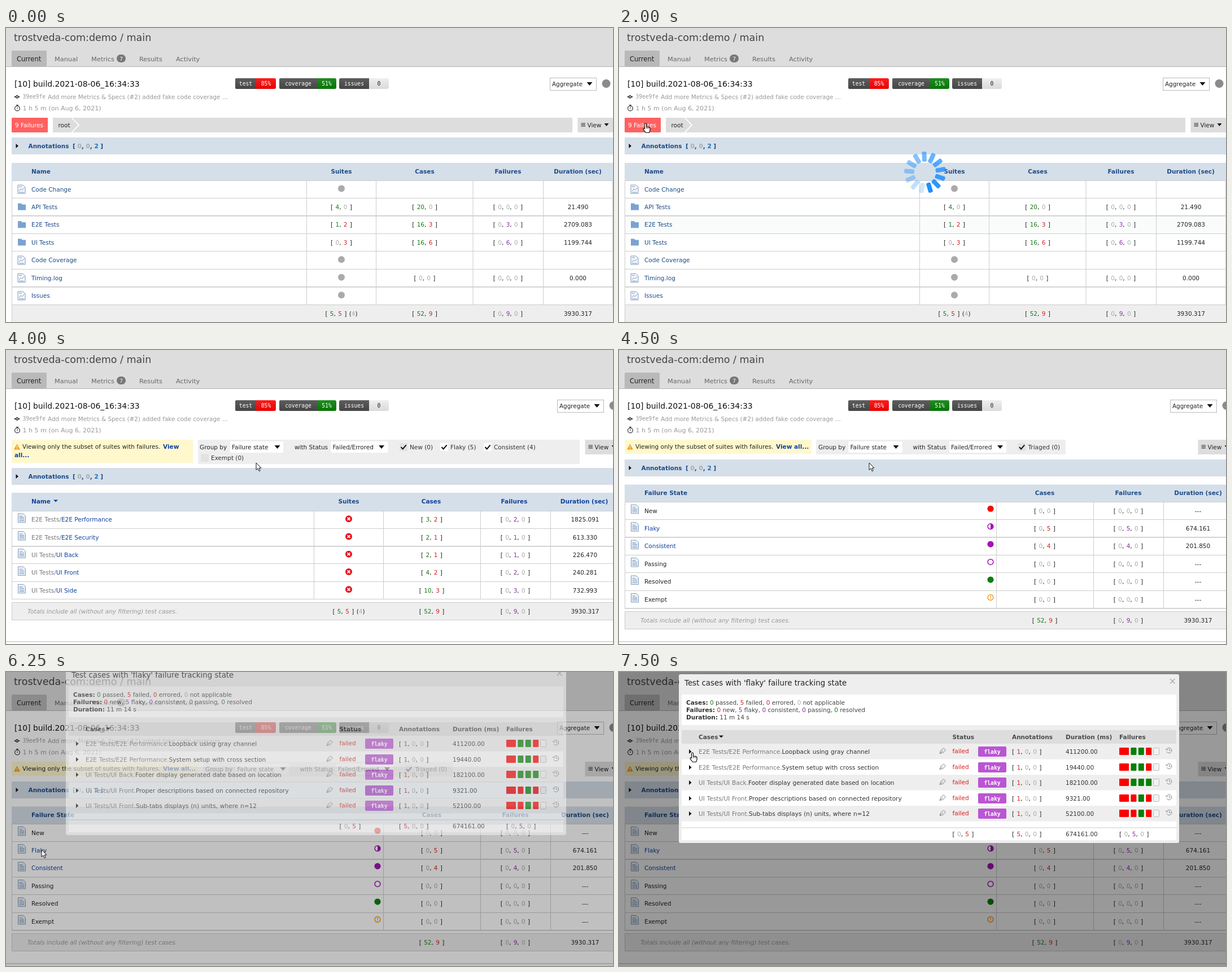
Recreate the animation shown at these times as an HTML page. Size 1075 px wide and 521 px high, loop 8000 ms.

```html
<!DOCTYPE html>
<html lang="en">
<head>
<meta charset="utf-8">
<title>Build results</title>
<style>
html, body { margin: 0; width: 100%; height: 100%; overflow: hidden; background: #fff; }
svg { display: block; width: 100vw; height: 100vh; }
text { font-family: "DejaVu Sans", Verdana, sans-serif; white-space: pre; }
.mono { font-family: "DejaVu Sans Mono", monospace; }
.vals { word-spacing: 1px; }
.case { word-spacing: .4px; }
</style>
</head>
<body>
<svg id="stage" viewBox="0 0 1075 521" xmlns="http://www.w3.org/2000/svg"></svg>
<script>
const LOOP = 8000, TICK = 250;
const LINK = '#1d4b87', LINK2 = '#10409c', INK = '#222', BAR = '#d5dfe9', RULE = '#ccc';
const TONE = { g: '#157a15', r: '#d81e1e', p: '#8a2ba8', b: '#1673c4', z: '#aaa' };

// --- drawing helpers; text is placed by the vertical middle of its line
const rect = (x, y, w, h, fill, extra = '') =>
  `<rect x="${x}" y="${y}" width="${w}" height="${h}" fill="${fill}" ${extra}/>`;
const path = (d, extra) => `<path d="${d}" ${extra}/>`;
const circle = (x, y, r, extra) => `<circle cx="${x}" cy="${y}" r="${r}" ${extra}/>`;
const group = (id, body, extra = '') => `<g id="${id}" ${extra}>${body}</g>`;
const span = (s, fill, extra = '') => `<tspan fill="${fill}" ${extra}>${s}</tspan>`;

function text(x, y, s, fill = INK, o = {}) {
  const size = o.size || 10.5;
  return `<text x="${x}" y="${Math.round(y + size * 0.36)}" font-size="${size}" fill="${fill}"` +
    ` text-anchor="${o.mid ? 'middle' : 'start'}" class="${o.cls || ''}" ${o.extra || ''}>${s}</text>`;
}
const bold = (x, y, s, fill, o = {}) => text(x, y, s, fill, { ...o, extra: 'font-weight="700"' });
const mid = (x, y, s, fill) => text(x, y, s, fill, { mid: true });

// "4g 0z" becomes [ 4, 0 ] with toned numbers
const num = v => span(v.slice(0, -1), TONE[v.slice(-1)]);
const list = s => '[ ' + s.split(' ').map(num).join(', ') + ' ]';
const vals = (x, y, s, isMid = true, tail = '') =>
  text(x, y, list(s) + tail, INK, { mid: isMid, cls: 'vals' });

const down = (x, y, w = 10, h = 6, fill = '#111') =>
  path(`M${x - w / 2} ${y - h / 2}h${w}l${-w / 2} ${h}z`, `fill="${fill}"`);
const right = (x, y) => path(`M${x} ${y - 4}l4.5 4l-4.5 4z`, 'fill="#111"');

function select(x, y, w, label, tri) {
  return rect(x, y - 10, w, 20, '#fff') + (label ? text(x + 3, y, label) : '') + down(tri, y);
}
function check(x, y, label, fill, on = true) {
  return rect(x, y - 7, 14, 14, fill, 'rx="1"') +
    (on ? path(`M${x + 2.5} ${y}l3.2 3.4l6-7`, 'fill="none" stroke="#111" stroke-width="2"') : '') +
    text(x + 18, y, label, '#333');
}

// --- icons
const docIcon = (x, y) =>
  path(`M${x} ${y - 7.5}h9l4 4v11.5h-13z`, 'fill="#eef3f9" stroke="#7d99bd"') +
  path(`M${x + 2} ${y - 3}h6m-6 2.7h9m-9 2.7h9m-9 2.6h9`, 'stroke="#7d99bd" stroke-width="1.1"');
const chartIcon = (x, y) =>
  path(`M${x} ${y - 7}h9l4 4v11h-13z`, 'fill="#f4f7fb" stroke="#7d99bd"') +
  path(`M${x + 2} ${y + 4}l3-4l2.5 2l4-4.5M${x + 2} ${y - 4}h5M${x + 2} ${y + 6}h9`, 'fill="none" stroke="#7d99bd"');
const folderIcon = (x, y) =>
  path(`M${x} ${y - 6}h6l1.5 2h6.5v10h-14z`, 'fill="#7ba2d0"');
const failIcon = (x, y) => circle(x, y, 6, 'fill="#e8121c"') +
  path(`M${x - 2.4} ${y - 2.4}l4.8 4.8m0-4.8l-4.8 4.8`, 'stroke="#fff" stroke-width="1.8"');
const warnIcon = y => path(`M19.5 ${y - 5}l5.5 10h-11z`, 'fill="#f5a11c"') +
  path(`M19.5 ${y - 1.5}v3m0 1v1.3`, 'stroke="#fff" stroke-width="1.2"');
const penIcon = (x, y) =>
  path(`M${x - 5} ${y + 4.5}l2-5.5l4.5-4l4 3l-4.5 5zl6-5.5`, 'fill="none" stroke="#888"');
const pastIcon = (x, y) =>
  path(`M${x - 4} ${y - 2}a4.6 4.6 0 1 1 0 4M${x - 5.5} ${y - 3}l1 2.2l2.6-.6M${x + .5} ${y - 2.5}v2.7h2.4`,
    'fill="none" stroke="#888"');

// --- page parts
function badge(x, split, end, label, value, color, ink = '#fff') {
  const o = { mid: true, cls: 'mono', size: 9.7 };
  return rect(x, 89, end - x, 19, color, 'rx="3"') +
    path(`M${split} 89H${x + 3}a3 3 0 0 0-3 3v13a3 3 0 0 0 3 3H${split}z`, 'fill="#4c4c4c"') +
    rect(x, 89, end - x, 19, 'url(#gloss)', 'rx="3"') +
    text((x + split) / 2, 99, label, '#fff', o) + text((split + end) / 2, 99, value, ink, o);
}

function header() {
  const tabs = [['Manual', 86], ['Metrics', 151], ['Results', 236], ['Activity', 301]];
  return rect(0, 0, 1075, 68, '#ddd') + rect(0, 68, 1075, 1, '#b4b4b4') +
    text(14, 17, 'trostveda-com:demo / main', '#444', { size: 17.5 }) +
    rect(10, 40, 62, 28, '#b9b9b9', 'rx="2"') + text(19, 55, 'Current', INK, { size: 11.5 }) +
    tabs.map(([s, x]) => text(x, 55, s, '#666', { size: 11.3 })).join('') +
    rect(196, 47, 16, 14, '#777', 'rx="7"') + text(204, 54.5, '7', '#fff', { size: 9, mid: true }) +
    text(15, 99, '[10] build.2021-08-06_16:34:33', '#111', { size: 13.9 }) +
    path('M14.5 122h10', 'stroke="#222" stroke-width="1.4"') +
    circle(19.5, 122, 2, 'fill="#fff" stroke="#222" stroke-width="1.4"') +
    text(29.5, 122, '39ee9fe', '#999', { size: 9.6, cls: 'mono' }) +
    text(74, 122, 'Add more Metrics &amp; Specs (#2) added fake code coverage ...', '#999', { size: 10.43 }) +
    circle(20, 142.5, 4.4, 'fill="none" stroke="#333" stroke-width="1.2"') +
    path('M18 136.5h4m-2 0v2m0 2v2.5', 'stroke="#333" stroke-width="1.2"') +
    text(29.5, 142.5, '1 h 5 m (on Aug 6, 2021)', '#999', { size: 11.05 }) +
    badge(406, 443, 478, 'test', '85%', '#fb0505') +
    badge(484, 551, 585, 'coverage', '51%', '#098009') +
    badge(590, 643, 678, 'issues', '0', '#eee', '#222');
}

const controls = () =>
  rect(963.5, 88.5, 82, 22, '#fff', 'stroke="#bbb"') + text(967, 99, 'Aggregate', INK, { size: 10.4 }) +
  down(1033.5, 99) + circle(1063, 98.5, 7.5, 'fill="#8b8b8b"') +
  rect(1012.5, 159, 70, 26, '#ddd') + text(1029.5, 172, 'View') + down(1063.5, 171.5, 8, 5) +
  path('M1018.5 169h7.5m-7.5 2.5h7.5m-7.5 2.5h7.5', 'stroke="#222" stroke-width="1.1"');

const annotations = top => rect(10, top, 1065, 30, BAR) + right(17.5, top + 15) +
  bold(39.5, top + 15, 'Annotations', LINK) + bold(118, top + 15, list('0z 0z 2b'), LINK);

// Row rules and column rules of a table; cell() fills each row
function table(top, pitch, cols, rows, cell) {
  const bottom = top + pitch * rows.length;
  let s = rows.map((r, i) => cell(r, top + pitch * (i + .5))).join('');
  for (let i = 0; i <= rows.length; i++)
    s += rect(10, Math.floor(top + pitch * i), 1065, i % 4 === 2 ? 1.7 : 1, RULE);
  return s + [10, ...cols].map(x => rect(x, top, 1, bottom - top, RULE)).join('');
}

const totals = (y, suites) => rect(10.5, y, 1070, 31, '#eee', `stroke="${RULE}"`) +
  text(38, y + 15.5, 'Totals include all (without any filtering) test cases.', '#999', { extra: 'font-style="italic"' }) +
  (suites ? vals(607, y + 15.5, '5g 5r', true, ` (${num('4z')})`) : '') +
  vals(754, y + 15.5, '52g 9r') + vals(902, y + 15.5, '0z 9p 0z') + mid(1025.5, y + 15.5, '3930.317') +
  rect(0, 516, 1075, 1.5, RULE);

const heads = (y, items, fill) => items.map(([s, x]) => bold(x, y, s, fill, { mid: true })).join('');

function summaryPage() {
  const rows = [
    ['Code Change'], ['API Tests', '4g 0z', '20g 0z', '0z 0z 0z', '21.490'],
    ['E2E Tests', '1g 2r', '16g 3r', '0z 3p 0z', '2709.083'],
    ['UI Tests', '0z 3r', '16g 6r', '0z 6p 0z', '1199.744'],
    ['Code Coverage'], ['Timing.log', '', '0z 0z', '0z 0z 0z', '0.000'], ['Issues']];
  return controls() +
    rect(10, 159, 64, 26, '#ff6161', 'rx="1"') + text(16, 172, '9 Failures', '#fff') +
    rect(83, 159, 920, 26, '#ddd') + text(92.5, 172, 'root') +
    path('M116 158.5l13 13.5l-13 13.5', 'fill="none" stroke="#fff" stroke-width="1.8"') +
    annotations(194) + rect(10, 239, 1065, 31, BAR) + bold(45, 254, 'Name', LINK) +
    heads(254, [['Suites', 594], ['Cases', 741.5], ['Failures', 889], ['Duration (sec)', 1012.5]], LINK) +
    rect(10, 333, 1065, 31, '#fafcfc', 'id="rowHover"') +
    table(270, 31.45, [532, 655, 826.5, 951, 1074], rows, ([name, su, ca, fa, du], y) =>
      (su ? folderIcon : chartIcon)(21, y - .5) + text(45, y, name, LINK) +
      (su ? vals(594, y, su) : circle(594, y - 1.2, 6, 'fill="#aaa"')) +
      (ca ? vals(741.5, y, ca) + vals(889, y, fa) + mid(1013, y, du) : '')) +
    rect(10, 491, 1065, 30, '#eee') + rect(10, 491, 1, 30, RULE) +
    vals(594, 506.5, '5g 5r', true, ` (${num('4z')})`) + vals(741.5, 506.5, '52g 9r') +
    vals(889, 506.5, '0z 9p 0z') + mid(1013, 506.5, '3930.317');
}

const notice = (w, h) => rect(10, 159, w, h, '#fff8cd') + warnIcon(171.5) +
  text(29, 171.5, 'Viewing only the subset of suites with failures.');

function suitePage() {
  const rows = [
    ['E2E Tests/', 'E2E Performance', '3g 2r', '2p', '1825.091'], ['E2E Tests/', 'E2E Security', '2g 1r', '1p', '613.330'],
    ['UI Tests/', 'UI Back', '2g 1r', '1p', '226.470'], ['UI Tests/', 'UI Front', '4g 2r', '2p', '240.281'],
    ['UI Tests/', 'UI Side', '10g 3r', '3p', '732.993']];
  const options = ['Suite name', 'Failure state', 'Annotation'];
  return group('', controls(), 'transform="translate(13)"') + notice(321, 41) +
    bold(278, 171.5, 'View', LINK2) + bold(15, 186.5, 'all...', LINK2) +
    rect(340, 159, 676, 43, '#eee') + text(343, 172, 'Group by') + select(397, 172, 94, '', 480.5) +
    text(400, 172, 'Suite name', INK, { extra: 'id="pick"' }) +
    text(511, 172, 'with Status') + select(575.5, 172, 101, 'Failed/Errored', 665) +
    check(697, 172, 'New (0)', '#e2e2e2') + check(769, 172, 'Flaky (5)', '#fff') +
    check(846, 172, 'Consistent (4)', '#fff') + check(345, 191, 'Exempt (0)', '#e2e2e2', false) +
    annotations(209) + rect(10, 253, 1065, 32, BAR) + bold(45, 268.5, 'Name', LINK2) + down(88, 267.5, 8, 4, LINK2) +
    heads(268.5, [['Suites', 607]], LINK) +
    heads(268.5, [['Cases', 753], ['Failures', 900], ['Duration (sec)', 1024]], LINK2) +
    table(285, 31.3, [545, 668, 840, 964], rows, ([pre, name, ca, fa, du], y) =>
      docIcon(21.5, y - 3) + text(45, y, span(pre, '#777') + span(name, LINK2)) + failIcon(607, y - 1.5) +
      vals(754, y, ca) + vals(902, y, `0z ${fa} 0z`) + mid(1025.5, y, du)) +
    totals(447.5, true) +
    group('popup', rect(397.5, 182.5, 107, 58, '#fff', 'stroke="#888"') +
      rect(398, 183, 106, 19, '#1e76d8', 'id="option"') +
      options.map((s, i) => text(401, 192.5 + 19 * i, s, INK, { extra: `id="opt${i}"` })).join(''));
}

function statePage() {
  const rows = [['New', '0z', '0z'], ['Flaky', '5r', '5p', '674.161'], ['Consistent', '4r', '4p', '201.850'],
    ['Passing', '0z', '0z'], ['Resolved', '0z', '0z'], ['Exempt', '0z', '0z']];
  const purple = '#a512b8';
  const ring = c => `fill="#fff" stroke="${c}" stroke-width="1.5"`;
  const dots = {
    New: y => circle(658, y, 5.6, 'fill="#f50808"'),
    Flaky: y => circle(658, y, 4.9, ring(purple)) + path(`M658 ${y - 5}a5 5 0 0 1 0 10z`, `fill="${purple}"`),
    Consistent: y => circle(658, y, 5.6, `fill="${purple}"`),
    Passing: y => circle(658, y, 4.9, ring(purple)),
    Resolved: y => circle(658, y, 5.6, 'fill="#0a800a"'),
    Exempt: y => circle(658, y, 4.9, ring('#f29a20')) + path(`M658 ${y - 3}v3.5m0 1v1.5`, 'stroke="#f29a20" stroke-width="1.4"')
  };
  return group('', controls(), 'transform="translate(13)"') + notice(331, 25) +
    bold(278, 171.5, 'View all...', LINK2) +
    rect(349, 159, 442, 26, '#eee') + text(353, 172, 'Group by') + select(406.5, 172, 95, 'Failure state', 490.5) +
    text(520.5, 172, 'with Status') + select(585, 172, 101, 'Failed/Errored', 675) +
    check(706.5, 172, 'Triaged (0)', '#e2e2e2') +
    annotations(194) + rect(10, 238.5, 1065, 31, BAR) + bold(45, 253.5, 'Failure State', LINK) +
    heads(253.5, [['Cases', 754], ['Failures', 902], ['Duration (sec)', 1025.5]], LINK) +
    rect(10, 301, 1065, 31, '#f8fafb', 'id="flakyHover"') +
    table(269, 31.45, [668, 840, 964], rows, ([name, ca, fa, du], y) =>
      docIcon(21.5, y - 3) + text(45, y, name, du ? LINK2 : INK, { extra: `id="state${name}"` }) +
      dots[name](y - 3.5) + vals(754, y, '0z ' + ca) + vals(902, y, `0z ${fa} 0z`) + mid(1025.5, y, du || '---')) +
    totals(463.5, false);
}

function dialog() {
  const rows = [
    ['E2E Tests/E2E Performance.', 'Loopback using gray channel', '411200.00', 'rggr'],
    ['E2E Tests/E2E Performance.', 'System setup with cross section', '19440.00', 'rggr'],
    ['UI Tests/UI Back.', 'Footer display generated date based on location', '182100.00', 'rggg'],
    ['UI Tests/UI Front.', 'Proper descriptions based on connected repository', '9321.00', 'rrgr'],
    ['UI Tests/UI Front.', 'Sub-tabs displays (n) units, where n=12', '52100.00', 'rrgr']];
  const strong = s => span(s, '#333', 'font-weight="700"');
  const info = (y, label, s) => text(119, y, strong(label) + ' ' + s, '#444');
  const runs = (y, marks) => [...marks].map((m, i) =>
    rect(i ? 893 + 13.4 * i : 886, y - 7, i ? 10 : 17, 13, m === 'r' ? '#fb0000' : '#078007', 'rx="1"')).join('') +
    rect(946.5, y - 6.5, 10, 12, '#f2f2f2', 'rx="1" stroke="#bbb"');
  return rect(106, 4, 886, 299, '#eee', 'rx="3"') +
    text(116, 19.5, "Test cases with 'flaky' failure tracking state", INK, { size: 13.35 }) +
    path('M976 12l8.5 8.5m0-8.5l-8.5 8.5', 'stroke="#aaa" stroke-width="1.4"') +
    rect(111, 40, 876, 54, '#fff') +
    info(54, 'Cases:', `${num('0g')} passed, ${num('5r')} failed, ${num('0r')} errored, ${num('0z')} not applicable`) +
    info(67, 'Failures:', `${num('0r')} new, ${num('5p')} flaky, ${num('0p')} consistent, ${num('0p')} passing, ${num('0g')} resolved`) +
    info(80, 'Duration:', '11 m 14 s') +
    rect(111, 103, 876, 195, '#fff') + rect(111, 103, 876, 24, '#ddd') +
    [['Cases', 141], ['Status', 590.5], ['Annotations', 696], ['Duration (ms)', 791], ['Failures', 886]]
      .map(([s, x]) => bold(x, 115.5, s, '#4a4a4a')).join('') + down(181, 114.5, 8, 4) +
    rows.map(([pre, name, du, marks], i) => {
      const y = Math.round(141 + 27.6 * i);
      return (i % 2 ? '' : rect(111, y - 14, 876, 27.6, '#eee')) + right(124, y) +
        text(141, y, span(pre, '#777') + span(name, '#333'), INK, { size: 10.55, cls: 'case' }) + penIcon(573, y - 1) +
        text(590.5, y - .5, 'failed', TONE.r) + rect(636, y - 9, 50, 18, '#ba55d3', 'rx="2"') +
        text(661, y + 1, 'flaky', '#fff', { mid: true, cls: 'mono', size: 9.7, extra: 'font-weight="700"' }) +
        vals(696, y, '1r 0z 0z', false) + text(791, y, du, '#333') + runs(y, marks) + pastIcon(974, y - 2);
    }).join('') + rect(111, 275.5, 876, 1, RULE) +
    vals(590.5, 287, '0z 5r', false) + vals(696, 287, '5r 0z 0z', false) +
    text(791, 287, '674161.00', '#333') + vals(886, 287, '0z 5p 0z', false);
}

const SPOKES = 13;
const spinner = () => Array.from({ length: SPOKES }, (_, i) =>
  rect(19, -4, 18, 8, '#1e90ff', `rx="2.5" opacity="${1 - .78 * i / (SPOKES - 1)}" transform="rotate(${73.5 - 360 / SPOKES * i})"`)).join('');

const pointers = group('arrow', path('M0 0v12.5l3-2.6l2.2 4.8l2-.9l-2.2-4.7h4z', 'fill="#fff" stroke="#111"')) +
  group('hand', path('M2.500 10.500V2q1.500-2.500 3 0V7q5.500 0 6.500 2v4.500l-1.500 4H4.500L0 11.500q0-2.500 2.500-1z'.replace(/00\b/g, ''), 'fill="#fff" stroke="#111" stroke-width="1.2"') +
    path('M5.500 7v3.500m2.200-3v3m2.200-2.500v2.500'.replace(/00\b/g, ''), 'stroke="#111" stroke-width=".8"'));

const stage = document.getElementById('stage');
stage.innerHTML =
  '<defs><linearGradient id="gloss" x2="0" y2="1"><stop stop-color="#fff" stop-opacity=".1"/>' +
  '<stop offset="1" stop-opacity=".08"/></linearGradient></defs>' +
  rect(0, 0, 1075, 521, '#fff') + header() +
  group('summary', summaryPage()) + group('suites', suitePage()) + group('states', statePage()) +
  group('spin', spinner()) + rect(0, 0, 1075, 521, '#000', 'id="shade"') +
  group('dialog', dialog()) + group('cursor', pointers);

// --- motion
const el = id => document.getElementById(id);
const show = (id, on) => el(id).setAttribute('display', on ? 'inline' : 'none');
const set = (id, key, v) => el(id).setAttribute(key, v);
const within = (t, a, b) => t >= a && t < b;

// time, x, y
const TRACK = [[250, 6, 356], [1250, 34, 222], [1500, 43, 168], [2250, 43, 168], [2500, 137, 228],
  [3000, 442, 176], [3500, 442, 176], [3750, 443, 200], [4500, 443, 200], [5500, 63, 315],
  [6500, 63, 315], [7500, 126, 142]];

function cursorAt(t) {
  const i = TRACK.findIndex(k => k[0] > t);
  if (i < 0) return TRACK[TRACK.length - 1].slice(1);
  if (i === 0) return TRACK[0].slice(1);
  const [t0, x0, y0] = TRACK[i - 1], [t1, x1, y1] = TRACK[i];
  const p = (t - t0) / (t1 - t0);
  return [x0 + (x1 - x0) * p, y0 + (y1 - y0) * p];
}

function render(ms) {
  const t = Math.floor(ms % LOOP / TICK) * TICK;
  show('summary', t < 2250);
  show('suites', within(t, 2250, 4500));
  show('states', t >= 4500);
  show('rowHover', t >= 250);

  const chosen = t >= 3750;
  show('popup', within(t, 3500, 4000));
  set('option', 'y', chosen ? 202 : 183);
  set('opt0', 'fill', chosen ? INK : '#fff');
  set('opt1', 'fill', chosen ? '#fff' : INK);
  el('pick').textContent = t >= 4000 ? 'Failure state' : 'Suite name';

  const onFlaky = within(t, 5500, 6250);
  show('flakyHover', onFlaky);
  set('stateFlaky', 'text-decoration', onFlaky ? 'underline' : 'none');

  show('spin', within(t, 2000, 2250) || within(t, 6000, 6250));
  set('spin', 'transform', `translate(${t < 4000 ? 542 : 549} 256)`);

  const open = t < 6250 ? 0 : t < 6500 ? .62 : 1;
  set('shade', 'opacity', .4 * open);
  set('dialog', 'opacity', open);
  set('dialog', 'transform', `translate(0 ${Math.round(-37 * (1 - open))})`);

  const [x, y] = cursorAt(t);
  const hand = within(t, 1500, 2250) || onFlaky || t >= 7500;
  show('cursor', t >= 250);
  show('hand', hand);
  show('arrow', !hand);
  set('cursor', 'transform', `translate(${x} ${y})`);
}

const start = performance.now();
function loop() {
  render(performance.now() - start);
  requestAnimationFrame(loop);
}
loop();
</script>
</body>
</html>
```
